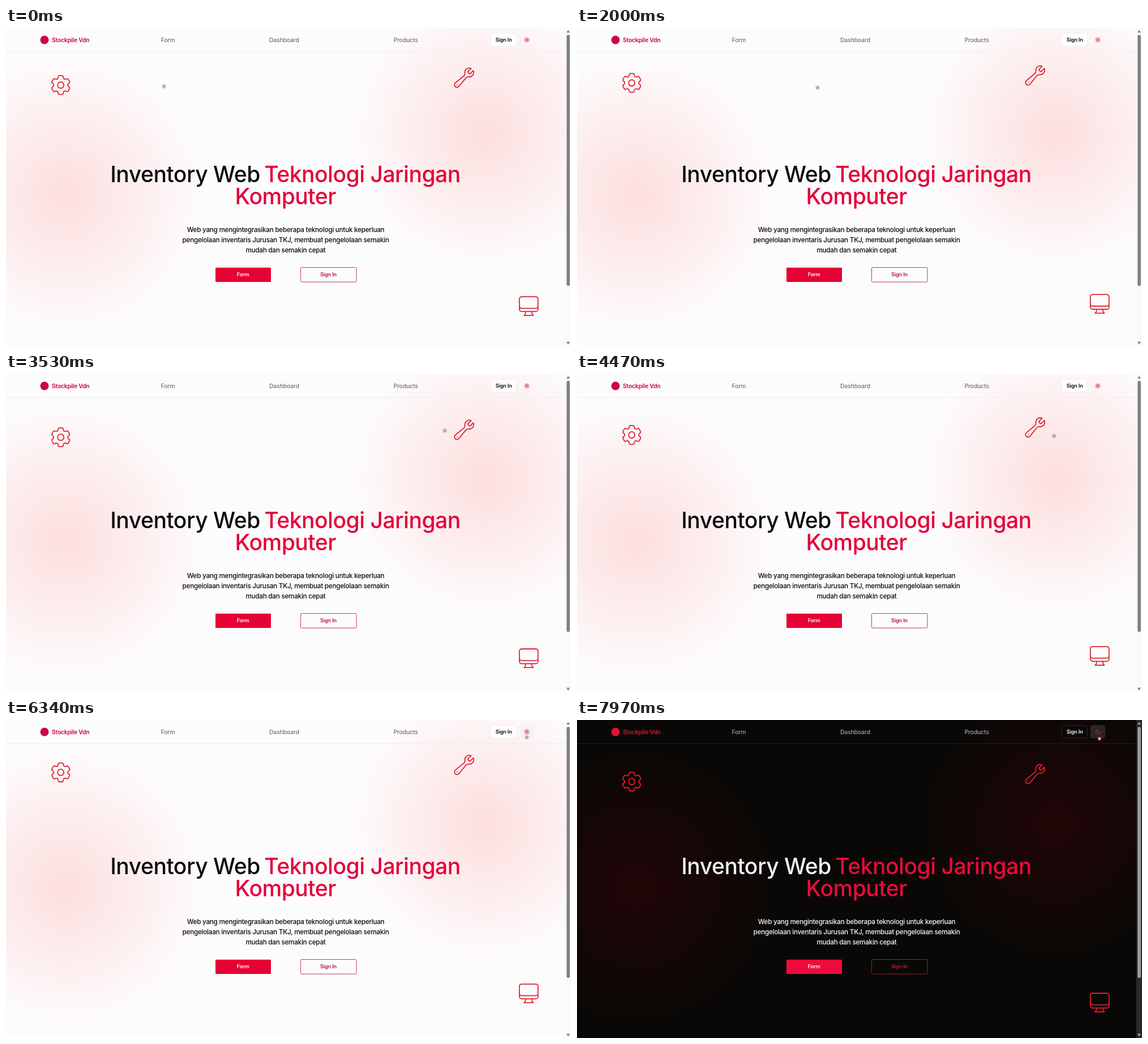
Animation, 998 px wide and 561 px high, one loop 8 s. Source, as an HTML page with a canvas:

```html
<!DOCTYPE html>
<html lang="id">
<head>
<meta charset="utf-8">
<title>Inventory Web</title>
<style>
html, body { margin: 0; width: 100%; height: 100%; overflow: hidden; background: #fdfcfd; }
canvas { display: block; width: 998px; height: 561px; }
</style>
</head>
<body>
<canvas id="stage" width="998" height="561"></canvas>
<script>
const ctx = document.getElementById('stage').getContext('2d');
const W = 998, H = 561, LOOP = 8000;
const TOGGLE_AT = 6750, HOVER_AT = 6240;
const BOB_PERIOD = 5000, BOB_TOP = 1160, BOB_SIZE = 9.75;

const LIGHT = {
  bg: '#fdfcfd', glow: '253,217,217', glowAlpha: 0.86,
  line: '#ededee', text: '#09090b', heading: '#09090b', nav: '#71717a',
  red: '#e2023c', brand: '#cb0540', icon: '#d92632',
  button: '#e60234', outline: '#c4346f', outlineText: '#c40a4b',
  signBg: '#ffffff', signLine: '#efeeef', hover: '#f4f3f4', toggle: '#cf1440',
  track: '#fafafb', thumb: '#818182', arrow: '#818182'
};
const DARK = {
  bg: '#090806', glow: '46,4,8', glowAlpha: 0.68,
  line: '#211d1b', text: '#fafafa', heading: '#f2f2f2', nav: '#a1a1aa',
  red: '#eb0a3b', brand: '#e01238', icon: '#e51f2e',
  button: '#ee0b3c', outline: '#b01826', outlineText: '#d01232',
  signBg: '#090807', signLine: '#292523', hover: '#2a2624', toggle: '#e01238',
  track: '#2b2a29', thumb: '#9d9d9d', arrow: '#a3a3a3'
};

// Pointer stops: time, x, y
const STOPS = [
  [0, 279, 103], [1300, 710, 127], [2670, 162, 85], [3530, 775, 100],
  [5300, 897, 117], [6400, 920, 30], [6940, 922, 34], [8000, 923, 33]
];

const WRENCH = new Path2D('M21.75 6.75a4.5 4.5 0 0 1-4.884 4.484c-1.076-.091-2.264.071-2.95.904l-7.152 8.684a2.548 2.548 0 1 1-3.586-3.586l8.684-7.152c.833-.686.995-1.874.904-2.95a4.5 4.5 0 0 1 6.336-4.486l-3.276 3.276a3.004 3.004 0 0 0 2.25 2.25l3.276-3.276c.256.565.398 1.192.398 1.852ZM4.867 19.125h.008v.008h-.008v-.008Z');
const MONITOR = new Path2D('M9 17.25v1.007a3 3 0 0 1-.879 2.122L7.5 21h9l-.621-.621A3 3 0 0 1 15 18.257V17.25m6-12V15a2.25 2.25 0 0 1-2.25 2.25H5.25A2.25 2.25 0 0 1 3 15V5.25m18 0A2.25 2.25 0 0 0 18.75 3H5.25A2.25 2.25 0 0 0 3 5.25m18 0V12a2.25 2.25 0 0 1-2.25 2.25H5.25A2.25 2.25 0 0 1 3 12V5.25');
const MOON = new Path2D('M12 3a6 6 0 0 0 9 9 9 9 0 1 1-9-9Z');
const GEAR = makeGear();
const SUN = makeSun();

function makeGear() {
  const tooth = new Path2D('M-2.406-8.06c.09-.542.56-.94 1.11-.94h2.593c.55 0 1.02.398 1.11.94l.213 1.281c.063.374.313.686.645.87l.22.127c.325.196.72.257 1.075.124l1.217-.456');
  const gear = new Path2D();
  for (let i = 0; i < 6; i++) {
    gear.addPath(tooth, new DOMMatrix().translate(12, 12).rotate(i * 60));
  }
  gear.moveTo(15, 12);
  gear.arc(12, 12, 3, 0, Math.PI * 2);
  return gear;
}

function makeSun() {
  const sun = new Path2D();
  sun.arc(12, 12, 4, 0, Math.PI * 2);
  for (let i = 0; i < 8; i++) {
    const c = Math.cos(i * Math.PI / 4), s = Math.sin(i * Math.PI / 4);
    sun.moveTo(12 + 8 * c, 12 + 8 * s);
    sun.lineTo(12 + 10 * c, 12 + 10 * s);
  }
  return sun;
}

// cubic-bezier(.42, 0, .58, 1), solved by bisection
function easeInOut(x) {
  let lo = 0, hi = 1, s = 0.5;
  for (let i = 0; i < 20; i++) {
    s = (lo + hi) / 2;
    const at = 1.26 * (1 - s) * (1 - s) * s + 1.74 * (1 - s) * s * s + s * s * s;
    if (at < x) lo = s; else hi = s;
  }
  return s * s * (3 - 2 * s);
}

function bobAt(t) {
  const phase = ((t - BOB_TOP + BOB_PERIOD) % BOB_PERIOD) / BOB_PERIOD;
  const k = easeInOut(1 - Math.abs(1 - 2 * phase));
  return BOB_SIZE * (2 * k - 1);
}

function icon(path, x, y, scale, weight, color) {
  ctx.save();
  ctx.translate(x, y);
  ctx.scale(scale, scale);
  ctx.translate(-12, -12);
  ctx.lineWidth = weight / scale;
  ctx.lineCap = ctx.lineJoin = 'round';
  ctx.strokeStyle = color;
  ctx.stroke(path);
  ctx.restore();
}

function text(str, x, y, size, weight, color, tracking = -0.015, align = 'center') {
  ctx.font = `${weight} ${size}px Inter, sans-serif`;
  ctx.letterSpacing = `${tracking * size}px`;
  ctx.textAlign = align;
  ctx.fillStyle = color;
  ctx.fillText(str, x, y);
}

function box(x, y, w, h, r, fill, stroke) {
  ctx.beginPath();
  ctx.roundRect(x, y, w, h, r);
  if (fill) { ctx.fillStyle = fill; ctx.fill(); }
  if (stroke) { ctx.strokeStyle = stroke; ctx.lineWidth = 1; ctx.stroke(); }
}

function disc(x, y, r, color) {
  ctx.beginPath();
  ctx.arc(x, y, r, 0, Math.PI * 2);
  ctx.fillStyle = color;
  ctx.fill();
}

function glow(x, y, r, rgb, alpha) {
  const g = ctx.createRadialGradient(x, y, 0, x, y, r);
  g.addColorStop(0, `rgba(${rgb},${alpha})`);
  g.addColorStop(1, `rgba(${rgb},0)`);
  ctx.fillStyle = g;
  ctx.fillRect(x - r, y - r, r * 2, r * 2);
}

function triangle(x, y, dir, color) {
  ctx.beginPath();
  ctx.moveTo(x - 3.2, y + 2 * dir);
  ctx.lineTo(x + 3.2, y + 2 * dir);
  ctx.lineTo(x, y - 2.6 * dir);
  ctx.fillStyle = color;
  ctx.fill();
}

function pointerAt(t) {
  let i = 0;
  while (i < STOPS.length - 2 && t >= STOPS[i + 1][0]) i++;
  const [t0, x0, y0] = STOPS[i], [t1, x1, y1] = STOPS[i + 1];
  const k = easeInOut((t - t0) / (t1 - t0));
  return [x0 + (x1 - x0) * k, y0 + (y1 - y0) * k];
}

function header(c, dark, hover) {
  ctx.fillStyle = c.line;
  ctx.fillRect(0, 41, 988, 1);
  disc(68, 21, 7.5, c.brand);
  text('Stockpile Vdn', 81, 24.5, 10.4, 600, c.brand, -0.02, 'left');
  text('Form', 286, 24.5, 10.4, 500, c.nav);
  text('Dashboard', 491.3, 24.5, 10.4, 500, c.nav);
  text('Products', 706, 24.5, 10.4, 500, c.nav);
  box(856.5, 9.5, 45, 22.5, 4, c.signBg, c.signLine);
  text('Sign In', 879.2, 24.2, 9.1, 600, c.text);
  if (hover) box(907, 9, 26, 23.5, 4, c.hover);
  icon(dark ? MOON : SUN, 920, 20.9, 0.433, 1.1, c.toggle);
}

function hero(c) {
  text('Inventory Web', 316.5, 271.5, 39, 500, c.heading, -0.012);
  text('Teknologi Jaringan', 629.5, 271.5, 39, 500, c.red, -0.012);
  text('Komputer', 493.7, 310.5, 39, 500, c.red, -0.012);
  [
    'Web yang mengintegrasikan beberapa teknologi untuk keperluan',
    'pengelolaan inventaris Jurusan TKJ, membuat pengelolaan semakin',
    'mudah dan semakin cepat'
  ].forEach((line, i) => text(line, 494, 360 + i * 18.2, 11.7, 450, c.text, -0.021));
  box(370, 422.7, 98, 25.2, 1, c.button);
  text('Form', 418.7, 438.4, 9.1, 600, '#fff');
  box(520.5, 422.5, 98.5, 25.5, 1.5, null, c.outline);
  text('Sign In', 569.5, 438.4, 9.1, 600, c.outlineText);
}

function scrollbar(c) {
  ctx.fillStyle = c.track;
  ctx.fillRect(988, 0, 10, H);
  box(990.2, 12, 5.8, 443, 2.9, c.thumb);
  triangle(993, 6, 1, c.arrow);
  triangle(993, 555.6, -1, c.arrow);
}

function pointer(t, dark) {
  const [x, y] = pointerAt(t);
  if (dark) {
    disc(x, y, 4, 'rgba(190,45,50,0.5)');
    disc(x, y, 2, '#fff3f0');
  } else {
    disc(x, y, 4, 'rgba(150,140,140,0.38)');
    disc(x, y, 2, 'rgba(150,142,142,0.75)');
  }
}

function draw(t) {
  const dark = t >= TOGGLE_AT, c = dark ? DARK : LIGHT;
  const bob = bobAt(t);
  ctx.fillStyle = c.bg;
  ctx.fillRect(0, 0, W, H);
  glow(105, 293, 248, c.glow, c.glowAlpha);
  glow(845, 185, 240, c.glow, c.glowAlpha);
  header(c, dark, t >= HOVER_AT);
  icon(GEAR, 96.7, 102 + bob, 1.84, 1.8, c.icon);
  icon(WRENCH, 809.2, 88.8 + bob, 1.74, 1.8, c.icon);
  icon(MONITOR, 923.3, 491.8 + bob, 1.83, 1.8, c.icon);
  hero(c);
  scrollbar(c);
  pointer(t, dark);
}

const start = performance.now();
function tick() {
  draw((performance.now() - start) % LOOP);
  requestAnimationFrame(tick);
}
tick();
</script>
</body>
</html>
```
